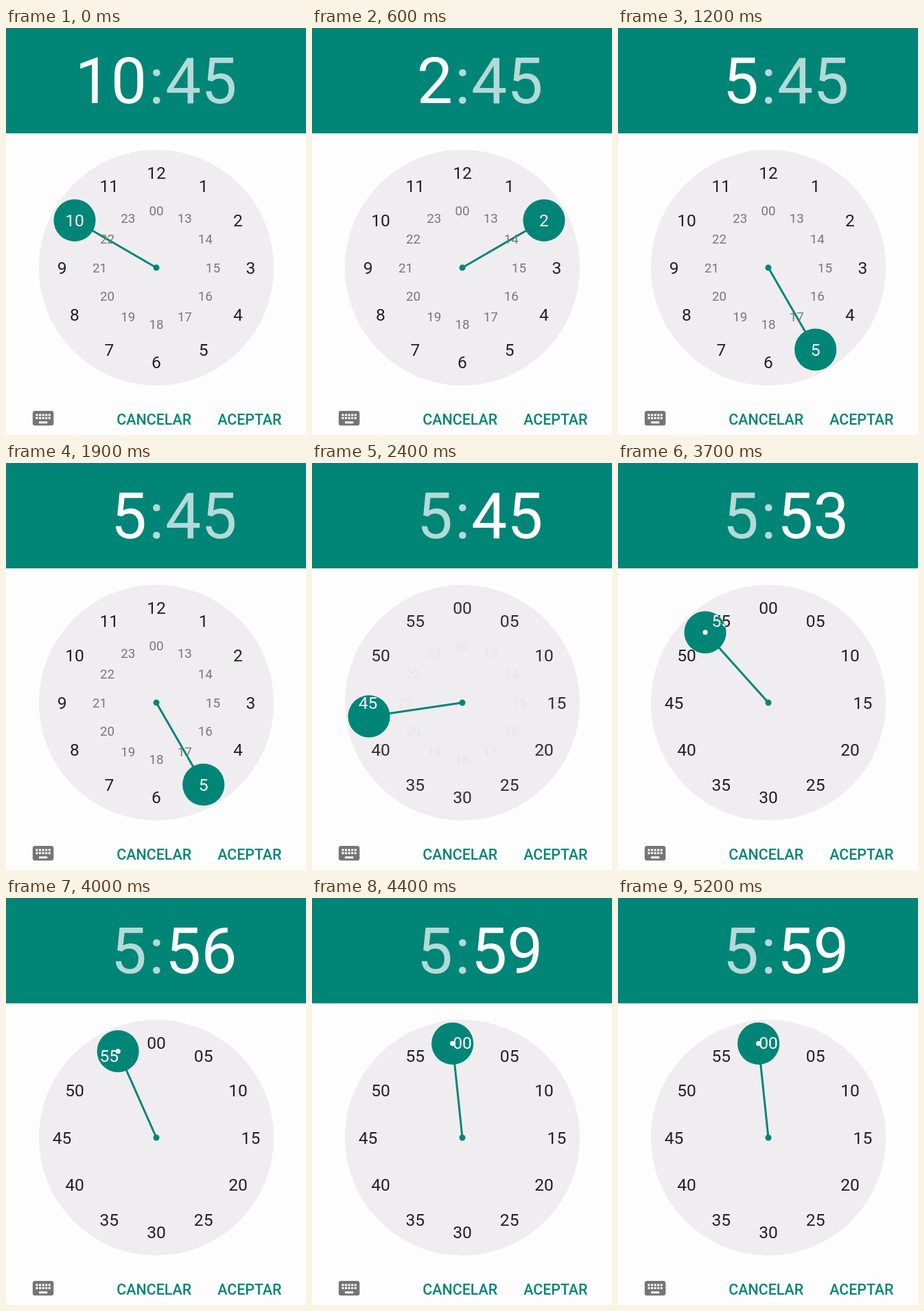
Write an HTML page that moves like this. It is 437 px wide and 591 px high and loops after 5300 ms.

```html
<!DOCTYPE html>
<html lang="es">
<head>
<meta charset="utf-8">
<title>Selector de hora</title>
<style>
  html, body { margin: 0; width: 100%; height: 100%; overflow: hidden; background: #fefdfe; }
  svg { display: block; width: 100%; height: 100%; font-family: Roboto, sans-serif; }
  .time { font-size: 93px; fill: #fff; }
  .dim { opacity: .7; }
  .dial { text-anchor: middle; }
  .outer { font-size: 24.6px; fill: #212121; }
  .inner { font-size: 18.8px; fill: #777; }
  .lit text { fill: #fff; }
  .button { font-size: 21.4px; font-weight: 500; fill: #008577; }
  .teal { fill: #008577; }
</style>
</head>
<body>
<svg viewBox="0 0 437 591">
  <rect class="teal" width="437" height="153"/>
  <rect width="437" height="1" fill="#2b756c"/>
  <g class="time">
    <text id="hour" x="205" y="109" text-anchor="end"></text>
    <text class="dim" x="219.3" y="109" text-anchor="middle">:</text>
    <text id="minute" x="232" y="109"></text>
  </g>

  <circle cx="219" cy="348" r="171.2" fill="#efedf0"/>
  <line id="hand" x1="219" y1="348" stroke="#008577" stroke-width="3"/>
  <g class="dial" id="labels">
    <g class="hours"></g>
    <g class="minutes"></g>
  </g>
  <circle id="knob" class="teal" r="30.6"/>
  <clipPath id="inKnob"><circle id="hole" r="30.6"/></clipPath>
  <g clip-path="url(#inKnob)">
    <g class="dial lit">
      <g class="hours"></g>
      <g class="minutes"></g>
    </g>
  </g>
  <circle id="dot" r="3.6" fill="#fff"/>
  <circle class="teal" cx="219" cy="348" r="4.5"/>

  <path fill="#757575" transform="translate(35.8 548.3) scale(1.525)"
    d="M20 5H4c-1.1 0-2 .9-2 2v10c0 1.1.9 2 2 2h16c1.1 0 2-.9 2-2V7c0-1.1-.9-2-2-2zm-9 3h2v2h-2zm0 3h2v2h-2zM8 8h2v2H8zm0 3h2v2H8zm-1 2H5v-2h2zm0-3H5V8h2zm9 7H8v-2h8zm0-4h-2v-2h2zm0-3h-2V8h2zm3 3h-2v-2h2zm0-3h-2V8h2z"/>
  <text class="button" x="161.3" y="575.5">CANCELAR</text>
  <text class="button" x="308.3" y="575.5">ACEPTAR</text>
</svg>
<script>
  const CX = 219, CY = 348, RADIUS = 137.4, INNER = 82.4;
  const LOOP = 5300, STEP = 100;
  const SWITCH = 1985, FADE = 500;

  // [start time, value]
  const hours = [[0, 10], [200, 11], [300, 12], [500, 1], [600, 2], [800, 3], [1000, 4], [1200, 5]];
  const minutes = [[0, 45], [3300, 46], [3400, 47], [3500, 48], [3600, 50], [3700, 53],
    [3800, 54], [3900, 55], [4000, 56], [4100, 57], [4200, 58], [4300, 59]];

  const $ = id => document.getElementById(id);
  const all = sel => document.querySelectorAll(sel);
  const pad = n => String(n).padStart(2, '0');
  const valueAt = (keys, t) => keys.filter(k => k[0] <= t).pop()[1];

  function polar(deg, r) {
    const a = deg * Math.PI / 180;
    return [CX + r * Math.sin(a), CY - r * Math.cos(a)];
  }

  function label(group, text, i, r, kind, drop) {
    const el = document.createElementNS('http://www.w3.org/2000/svg', 'text');
    const [x, y] = polar(i * 30, r);
    el.setAttribute('x', x);
    el.setAttribute('y', y + drop);
    el.setAttribute('class', kind);
    el.textContent = text;
    group.append(el);
  }

  for (let i = 0; i < 12; i++) {
    for (const g of all('.hours')) {
      label(g, i || 12, i, RADIUS, 'outer', 8.6);
      label(g, i ? i + 12 : '00', i, INNER, 'inner', 6.6);
    }
    for (const g of all('.minutes')) label(g, pad(i * 5), i, RADIUS, 'outer', 8.6);
  }

  function place(id, [x, y]) {
    $(id).setAttribute('cx', x);
    $(id).setAttribute('cy', y);
  }

  function draw(t) {
    const h = valueAt(hours, t), m = valueAt(minutes, t);
    const p = Math.min(1, Math.max(0, (t - SWITCH) / FADE));
    const mix = (1 - Math.cos(Math.PI * p)) / 2;
    const deg = h * 30 * (1 - mix) + m * 6 * mix;

    $('hour').textContent = h;
    $('minute').textContent = pad(m);
    $('hour').classList.toggle('dim', p > 0);
    $('minute').classList.toggle('dim', p === 0);

    for (const g of all('.hours')) g.style.opacity = 1 - mix;
    for (const g of all('.minutes')) g.style.opacity = mix;

    const tip = polar(deg, RADIUS);
    for (const id of ['knob', 'hole', 'dot']) place(id, tip);
    $('hand').setAttribute('x2', tip[0]);
    $('hand').setAttribute('y2', tip[1]);
    $('dot').style.opacity = m % 5 ? 1 : 0;
  }

  const start = performance.now();
  function tick() {
    const t = (performance.now() - start) % LOOP;
    draw(Math.floor(t / STEP) * STEP);
    requestAnimationFrame(tick);
  }
  tick();
</script>
</body>
</html>
```
